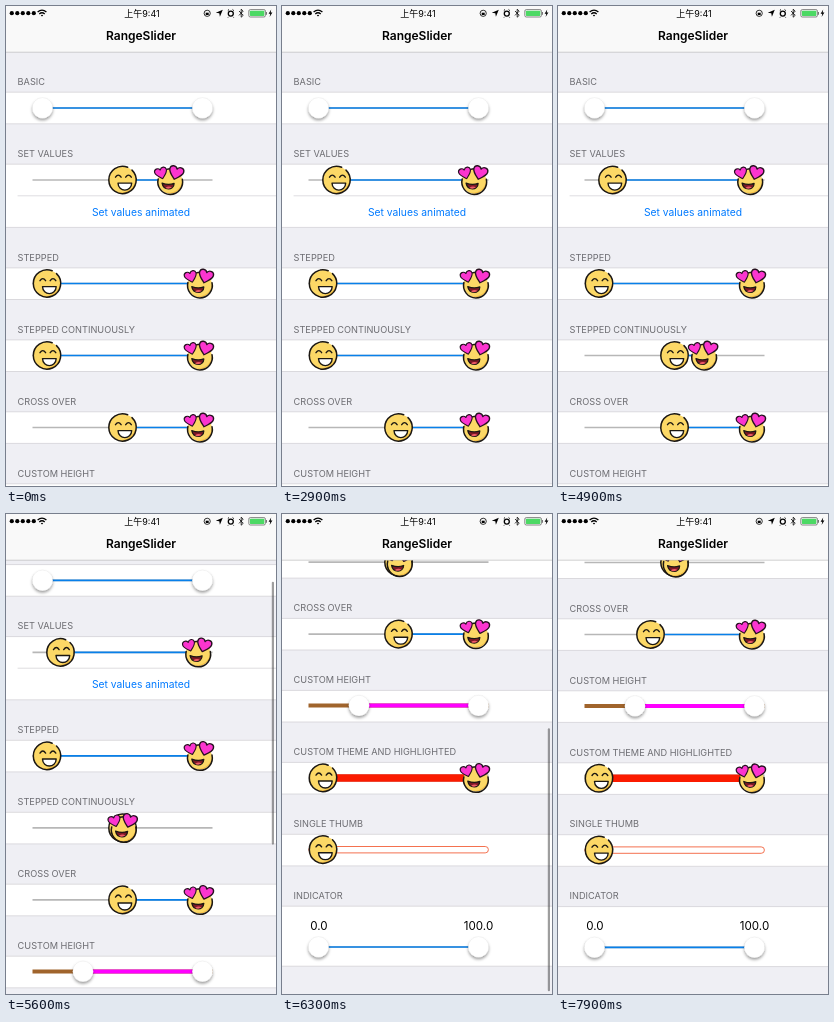
An HTML page that plays this animation: 270x480 px, repeating every 8 s.

```html
<!DOCTYPE html>
<html lang="en">
<head>
<meta charset="utf-8">
<title>RangeSlider</title>
<style>
html, body { margin: 0; width: 100%; height: 100%; overflow: hidden; background: #efeff4; }
svg { display: block; width: 100vw; height: 100vh; font-family: Inter, "Noto Sans CJK SC", "Noto Sans CJK", sans-serif; }
.header { font-size: 9.2px; fill: #6d6d72; }
.middle { text-anchor: middle; }
</style>
</head>
<body>
<svg viewBox="0 0 270 480" xmlns="http://www.w3.org/2000/svg">
  <defs>
    <filter id="shadow" x="-50%" y="-50%" width="200%" height="200%">
      <feDropShadow dx="0" dy="2" stdDeviation="1.5" flood-color="#000" flood-opacity=".38"/>
    </filter>
    <path id="heart" d="M0 6C-3 3.4-6.4.8-6.4-2.3C-6.4-6-1.6-6.6 0-3.4C1.6-6.6 6.4-6 6.4-2.3C6.4.8 3 3.4 0 6Z"
      fill="#fb35cf" stroke="#26101f" stroke-width="1.2" stroke-linejoin="round"/>
    <g id="white"><circle r="10.3" fill="#fff" stroke="#000" stroke-opacity=".1" stroke-width=".4" filter="url(#shadow)"/></g>
    <g id="grin" stroke-linecap="round" stroke-linejoin="round">
      <circle r="13.6" fill="#fcd866"/>
      <path d="M-9 9.8A13.3 13.3 0 0 0 12.8-3.5A14 14 0 0 1-9 9.8Z" fill="#f4bd42"/>
      <path d="M5.2-12.7A13.7 13.7 0 1 0 9.5-9.9" fill="none" stroke="#1b1712" stroke-width="1.5"/>
      <path d="M-7-2.8Q-4.2-7-1.4-2.8M3.2-2.8Q6-7 8.8-2.8" fill="none" stroke="#1b1712" stroke-width="1.4"/>
      <path d="M-4.5 3.1H9.2C9 12.4-4.3 12.4-4.5 3.1Z" fill="#fff" stroke="#1b1712" stroke-width="1.4"/>
    </g>
    <g id="love" stroke-linecap="round" stroke-linejoin="round">
      <circle cx=".6" cy="1.3" r="12.2" fill="#fcd866"/>
      <path d="M-6 11.5A12.2 12.2 0 0 0 12.6-1A13 13 0 0 1-6 11.5Z" fill="#f4bd42"/>
      <path d="M-11.3-1A12.4 12.4 0 1 0 12.8-.8M-3-10.6A12.4 12.4 0 0 1 3-11" fill="none" stroke="#1b1712" stroke-width="1.5"/>
      <path d="M-7.4 3.2Q-1 5.6 4.6 3.4C4.4 10.6-6 11-7.4 3.2Z" fill="#7d1826" stroke="#1b1712" stroke-width="1.3"/>
      <path d="M-4.2 7.8Q-.4 5.4 2.4 7.6Q-1.2 9.8-4.2 7.8Z" fill="#ef5967"/>
      <use href="#heart" transform="translate(-8.4-6.9) rotate(-16) scale(.95)"/>
      <use href="#heart" transform="translate(6.6-7.2) rotate(16) scale(1.12)"/>
    </g>
  </defs>
  <rect width="270" height="480" fill="#efeff4"/>
  <g id="content"></g>
  <rect id="scrollbar" x="265.8" width="2.2" height="263" rx="1.1" opacity="0"/>
  <rect width="270" height="46" fill="#f9f9f9"/>
  <path d="M0 46.2H270" stroke="#b2b2b2" stroke-width=".6"/>
  <g id="status"></g>
  <text class="middle" x="135" y="34.4" font-size="12" font-weight="600">RangeSlider</text>
</svg>
<script>
const LOOP = 8000, TRACK_START = 26.5, TRACK_END = 206.5, MAX_SCROLL = 301;
const BLUE = '#0880ea', GREY = '#b7b7b7';
const byId = id => document.getElementById(id);
const content = byId('content');

const add = (parent, markup) => parent.insertAdjacentHTML('beforeend', markup);
const line = (x1, x2, y, color, width) =>
  `<line x1="${x1}" x2="${x2}" y1="${y}" y2="${y}" stroke="${color}" stroke-width="${width}"/>`;

function addSection(title, top, height) {
  add(content, `<text class="header" x="11.6" y="${top - 7.3}">${title}</text>
    <rect y="${top}" width="270" height="${height}" fill="#fff"/>
    ${line(0, 270, top, '#c8c7cc', .6)}${line(0, 270, top + height, '#c8c7cc', .6)}`);
}

// Builds a two-thumb slider and returns a function that places its thumbs.
function addSlider(y, low, high, { thumbs = ['grin', 'love'], color = BLUE, back = GREY, width = 1.6 } = {}) {
  add(content, `<g transform="translate(0 ${y})">
    ${line(TRACK_START, TRACK_END, 0, back, width)}${line(low, high, 0, color, width)}
    ${thumbs.map(id => `<use href="#${id}"/>`).join('')}</g>`);
  const group = content.lastElementChild;
  const range = group.querySelectorAll('line')[1];
  const [left, right] = group.querySelectorAll('use');
  const place = (a, b) => {
    range.setAttribute('x1', a);
    range.setAttribute('x2', b);
    left.setAttribute('transform', `translate(${a})`);
    right.setAttribute('transform', `translate(${b})`);
  };
  place(low, high);
  return place;
}

const plain = { thumbs: ['white', 'white'] };
addSection('BASIC', 86.2, 31.6);
addSection('SET VALUES', 158.2, 63.2);
addSection('STEPPED', 261.9, 31.6);
addSection('STEPPED CONTINUOUSLY', 333.9, 31.6);
addSection('CROSS OVER', 405.8, 31.6);
addSection('CUSTOM HEIGHT', 477.8, 31.6);
addSection('CUSTOM THEME AND HIGHLIGHTED', 549.8, 31.6);
addSection('SINGLE THUMB', 621.7, 31.6);
addSection('INDICATOR', 693.6, 60);

add(content, `${line(11.6, 270, 189.8, '#c8c7cc', .6)}
  <text id="button" class="middle" x="135" y="209.6" font-size="10.3" fill="#007aff">Set values animated</text>`);
const button = byId('button');

addSlider(102, 36.5, 196.5, plain);
const placeSetValues = addSlider(174, 116.5, 163.5);
addSlider(277.5, 41, 193.2);
const placeStepped = addSlider(349.5, 41, 193.2);
const placeCrossOver = addSlider(421.5, 116.5, 193.2);
addSlider(493, 77, 196.5, { ...plain, color: '#f0f', back: '#a0642c', width: 4 });
addSlider(565.3, 41, 193.2, { color: '#fb1b00', width: 7.5 });
add(content, `<rect x="26.8" y="633.9" width="179.6" height="6.4" rx="3.2" fill="#fff" stroke="#f4714f"/>
  <use href="#grin" x="41" y="637"/>
  <g class="middle" font-size="11.6"><text x="37" y="717">0.0</text><text x="196.5" y="717">100.0</text></g>`);
addSlider(734.4, 36.5, 196.5, plain);

function drawStatus() {
  const dots = [6.2, 11.7, 17.2, 22.7, 28.2].map(x => `<circle cx="${x - .4}" cy="7.2" r="2.1"/>`).join('');
  add(byId('status'), `${dots}
    <g fill="none" stroke="#000" stroke-width="1.3">
      <path d="M31.6 6.1Q36 2.2 40.4 6.1M33.3 8Q36 5.6 38.7 8"/>
      <circle cx="201.2" cy="7.3" r="3.1" stroke-width=".8"/>
      <circle cx="224.8" cy="7.6" r="2.5"/>
      <path d="M221.8 4.6L223 3.5M227.8 4.6L226.6 3.5M222.6 10.8L222 11.5M227 10.8L227.6 11.5" stroke-width="1"/>
      <path d="M233 5L237.2 9.3L235.2 11.2V3.2L237.2 5.1L233 9.4" stroke-width=".8"/>
      <rect x="242.8" y="3.6" width="16.6" height="7.4" rx="1.5" stroke="#555" stroke-width=".7"/>
    </g>
    <path d="M34.8 9.2Q36 8.2 37.2 9.2L36 10.6Z"/>
    <rect x="199.7" y="6.7" width="3" height="2.3"/>
    <path d="M216.8 3.7L213.9 10.8L213.3 7.3L209.8 6.7Z"/>
    <rect x="243.9" y="4.7" width="14.4" height="5.2" rx=".6" fill="#4cd964"/>
    <path d="M260.2 6H261V8.7H260.2Z" fill="#555"/>
    <path d="M265.2 3.6L262.6 7.8H264.3L263.6 11L266.4 6.6H264.7Z"/>
    <text class="middle" x="136" y="10.5" font-size="9">上午9:41</text>`);
}
drawStatus();

const progress = (t, start, duration) => Math.min(1, Math.max(0, (t - start) / duration));
const ease = p => .5 - .5 * Math.cos(Math.PI * p);
// Sum of eased moves, each given as [start, duration, distance].
const travel = (t, from, ...moves) =>
  moves.reduce((x, [start, duration, distance]) => x + distance * ease(progress(t, start, duration)), from);

function render(t) {
  placeSetValues(
    travel(t, 116.5, [1000, 400, -62]),
    travel(t, 163.5, [1000, 400, 28]));
  placeStepped(
    travel(t, 41, [3200, 600, 37.8], [3900, 300, 37.7]),
    travel(t, 193.2, [4300, 300, -38.1], [4800, 300, -38.1]));
  placeCrossOver(116.5 - 24 * progress(t, 7500, 400), 193.2);

  const pressed = t >= 880 && t < 1580;
  button.setAttribute('opacity', pressed ? .25 + .75 * ease(progress(t, 1080, 500)) : 1);

  const scroll = travel(t, 0, [5400, 900, MAX_SCROLL + .4], [6300, 300, .6], [6750, 350, -1]);
  content.setAttribute('transform', `translate(0 ${-scroll})`);
  const bar = byId('scrollbar');
  bar.setAttribute('y', 48 + .552 * scroll);
  bar.setAttribute('opacity', .38 * progress(t, 5400, 100) * (1 - progress(t, 6800, 250)));
}

const started = performance.now();
function tick() {
  render((performance.now() - started) % LOOP);
  requestAnimationFrame(tick);
}
render(0);
requestAnimationFrame(tick);
</script>
</body>
</html>
```
